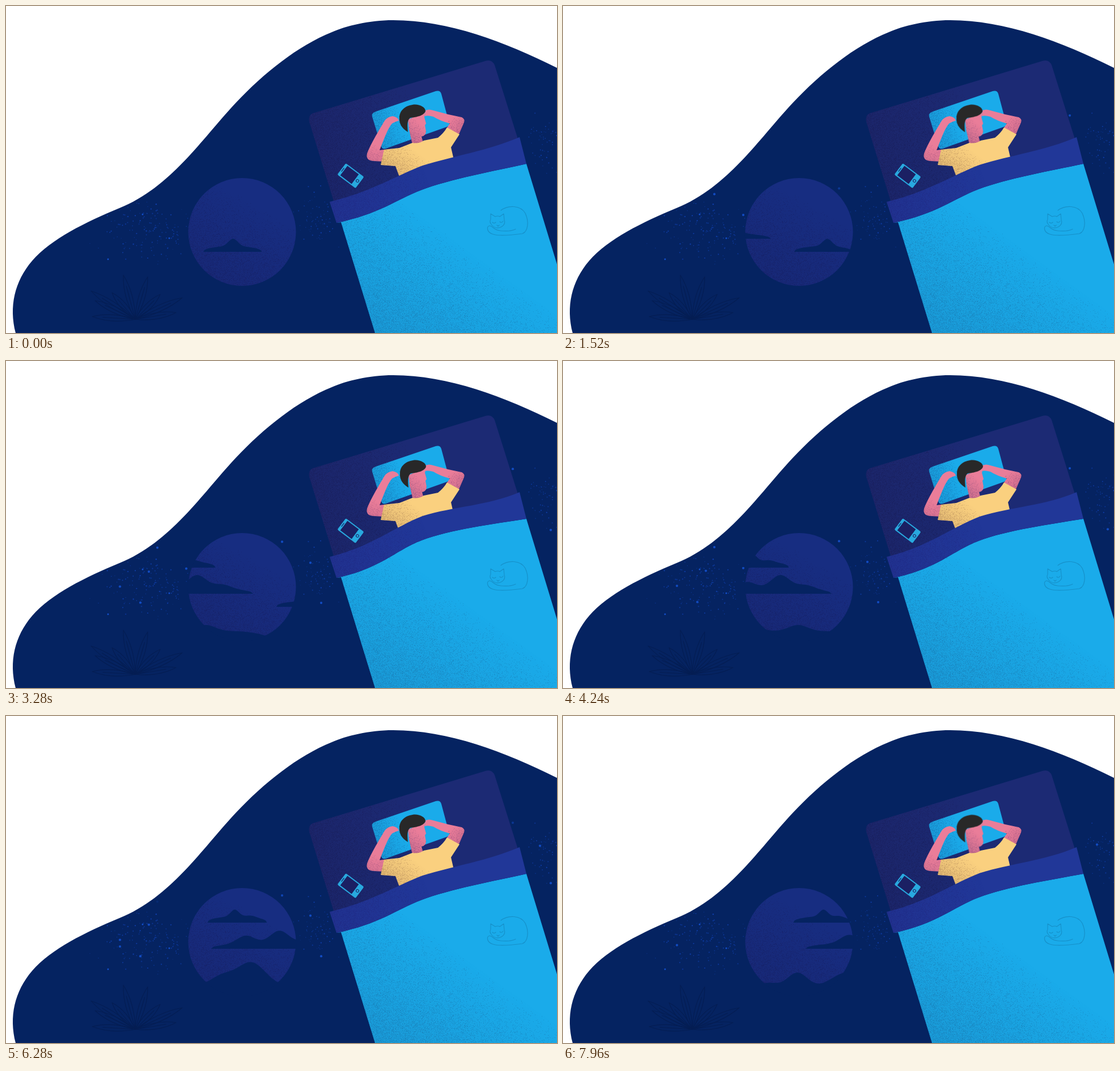
Animation of 972x576 px, one loop 8000 ms. Source, as an HTML page with a canvas:

```html
<!DOCTYPE html>
<html lang="en">
<head>
<meta charset="utf-8">
<title>Asleep under the moon</title>
<style>
html, body { margin: 0; width: 100%; height: 100%; overflow: hidden; background: #fff; }
canvas { display: block; width: 100%; height: 100%; }
</style>
</head>
<body>
<canvas id="stage" width="972" height="576"></canvas>
<script>
const W = 972, H = 576, LOOP = 8000;
const NIGHT = '#052361', SKY_BLUE = '#1aabea', SKIN = '#ea7d99', STAR = '#1450cc';
const stage = document.getElementById('stage').getContext('2d');

let seed = 7;
const random = () => {
  seed = (seed + 0x6D2B79F5) | 0;
  let r = Math.imul(seed ^ seed >>> 15, 1 | seed);
  r = r + Math.imul(r ^ r >>> 7, 61 | r) ^ r;
  return ((r ^ r >>> 14) >>> 0) / 4294967296;
};
const clamp = v => Math.max(0, Math.min(1, v));
const ramp = (t, a, b) => clamp((t - a) / (b - a));
const smooth = v => v * v * (3 - 2 * v);
const bell = (x, center, width) => Math.exp(-(((x - center) / width) ** 2) / 2);
const points = text => text.split(' ').map(p => p.split(',').map(Number));

function layer(draw) {
  const canvas = document.createElement('canvas');
  canvas.width = W;
  canvas.height = H;
  draw(canvas.getContext('2d'));
  return canvas;
}

const toPath = shape => typeof shape === 'string' ? new Path2D(shape) : shape;

function fill(c, shape, color) {
  c.fillStyle = color;
  c.fill(toPath(shape));
}

function stroke(c, shape, color, width) {
  c.strokeStyle = color;
  c.lineWidth = width;
  c.lineCap = c.lineJoin = 'round';
  c.stroke(toPath(shape));
}

function clipped(c, shape, draw) {
  c.save();
  c.clip(toPath(shape));
  draw();
  c.restore();
}

function dot(c, x, y, r) {
  c.beginPath();
  c.arc(x, y, r, 0, 7);
  c.fill();
}

// Soft shade plus fine speckles, both fading out from (x0, y0) to (x1, y1).
function grain(c, rgb, strength, [x, y, w, h], [x0, y0, x1, y1]) {
  const shade = c.createLinearGradient(x0, y0, x1, y1);
  shade.addColorStop(0, `rgba(${rgb},${strength * .5})`);
  shade.addColorStop(1, `rgba(${rgb},0)`);
  c.fillStyle = shade;
  c.fillRect(x, y, w, h);
  const dx = x1 - x0, dy = y1 - y0, len2 = dx * dx + dy * dy;
  c.fillStyle = `rgba(${rgb},${strength * .6})`;
  for (let py = y; py < y + h; py++) {
    for (let px = x; px < x + w; px++) {
      const fade = ((px - x0) * dx + (py - y0) * dy) / len2;
      if (random() > .5 + fade * .5) c.fillRect(px, py, 1, 1);
    }
  }
}

function shaded(c, shape, color, ...shade) {
  fill(c, shape, color);
  clipped(c, shape, () => grain(c, ...shade));
}

// ---- Night backdrop ----
function leaf(x, y) {
  const cx = 228, cy = 552, dx = x - cx, dy = y - cy, n = 11 / Math.hypot(dx, dy);
  const mx = cx + dx * .55, my = cy + dy * .55;
  return `M${cx} ${cy}Q${mx - dy * n} ${my + dx * n} ${x} ${y}Q${mx + dy * n} ${my - dx * n} ${cx} ${cy}` +
    `M${cx} ${cy}L${mx + dx * .2} ${my + dy * .2}`;
}

function speckle(c, cx, cy, sx, sy, count) {
  const spread = () => (random() + random() + random()) / 1.5 - 1;
  for (let i = 0; i < count; i++) {
    c.fillStyle = `rgba(18,70,190,${.35 + random() * .5})`;
    dot(c, cx + spread() * sx, cy + spread() * sy, .5 + random() * .7);
  }
}

const backdrop = layer(c => {
  const hill = 'M17 576C5 530 15 485 46 449C80 410 140 381 200 356C290 320 345 235 405 171' +
    'C455 118 515 70 575 46C600 35 640 25 683 25C780 25 880 63 972 109V576Z';
  fill(c, hill, NIGHT);
  for (const tip of points('150,502 157,519 152,547 187,505 207,474 250,477 272,508 311,514 300,540')) {
    stroke(c, leaf(...tip), '#041d53', 1.1);
  }
  clipped(c, hill, () => {
    speckle(c, 245, 396, 112, 72, 150);
    speckle(c, 553, 375, 62, 70, 75);
    speckle(c, 952, 244, 50, 68, 65);
  });
  c.fillStyle = STAR;
  for (const [x, y] of points('241,367 288,409 180,446')) dot(c, x, y, 1.5);
});

// ---- Stars that fade in one after another, rise a little and fade out ----
const starWaves = [
  { start: 500, spots: points('318,364 267,327 894,188 487,316 237,423 556,423 201,394 961,294 252,367 537,351') },
  { start: 5000, spots: points('942,225 201,402') }
];

function drawStars(t) {
  stage.fillStyle = STAR;
  for (const { start, spots } of starWaves) {
    spots.forEach(([x, y], i) => {
      const age = t - start - i * 220, life = clamp(age / 5800);
      stage.globalAlpha = .9 * smooth(ramp(age, 0, 700)) * smooth(ramp(age, 5800, 4900));
      dot(stage, x, y + 6 * (1 - life) ** 2, 2.1);
    });
  }
  stage.globalAlpha = 1;
}

// ---- Moon and clouds ----
const disc = r => {
  const path = new Path2D();
  path.arc(416.5, 398, r, 0, 7);
  return path;
};
const moonLayer = layer(c =>
  shaded(c, disc(95), '#172d81', '24,28,92', .55, [320, 302, 194, 194], [355, 490, 435, 345]));

// Each bump: position along the cloud, height, width. Bumps creep forward while the cloud drifts.
const clouds = [
  { x: 348, base: 433, width: 103, body: 10, speed: .0393, creep: 4e-5, bumps: [[.51, 13, .08]] },
  { x: 115, base: 410, width: 192, body: 10, speed: .0393, creep: 5e-5,
    bumps: [[0, 15, .08], [.32, 23, .085], [.56, 8, .08]] },
  { x: 165, base: 364, width: 105, body: 11, speed: .0303, creep: 3e-5, bumps: [[.27, 12, .07], [.55, 3, .08]] }
];

function cloudPath({ x, base, width, body, speed, creep, bumps }, t) {
  const path = new Path2D();
  for (let u = 0; u <= 1.001; u += .02) {
    const rise = bumps.reduce((sum, [at, high, wide]) => sum + high * bell(u, at + creep * t, wide), body);
    const taper = Math.max(0, Math.sin(Math.PI * u)) ** .4;
    path.lineTo(x + speed * t + u * width, base - rise * taper);
  }
  return path;
}

// Bank along the moon's lower edge: center, height, width of its swells.
const swells = [[-155, 6, 14], [-104, 24, 17], [-28, 17, 20], [24, 42, 25], [139, 11, 17]];

function bankPath(t) {
  const path = new Path2D(), drift = .065 * t;
  for (let x = 318; x <= 516; x += 2) {
    const u = x - drift;
    const front = 19 * ramp(u, 190, 275) ** 2 + 40 * ramp(u, 272, 290);
    path.lineTo(x, swells.reduce((y, [at, high, wide]) => y - high * bell(u, at, wide), 476 + front));
  }
  path.lineTo(516, 540);
  path.lineTo(318, 540);
  return path;
}

function drawMoon(t) {
  stage.drawImage(moonLayer, 0, 0);
  clipped(stage, disc(96), () => {
    for (const cloud of clouds) fill(stage, cloudPath(cloud, t), NIGHT);
    fill(stage, bankPath(t), NIGHT);
  });
}

// ---- Bed ----
const bedLayer = layer(c => {
  shaded(c, 'M541 189L845 97Q857 93 862 104L908 250L580 350L535 204Q533 192 541 189Z', '#1c2a74',
    '25,24,78', .5, [530, 90, 380, 260], [540, 280, 735, 220]);
  shaded(c, 'M652 186L758 150Q766 148 768 155L783 211L670 251Q664 253 662 247L646 195Q644 189 652 186Z', SKY_BLUE,
    '20,80,140', .45, [640, 145, 145, 110], [645, 225, 703, 205]);

  c.save();
  c.translate(608, 299);
  c.rotate(.645);
  c.fillStyle = '#28a9df';
  c.beginPath();
  c.roundRect(-20, -12.5, 40, 25, 2);
  c.fill();
  c.fillStyle = c.strokeStyle = '#1b2063';
  c.fillRect(-15, -10.5, 25, 21);
  c.fillRect(-18, -4, 1.2, 8);
  c.beginPath();
  c.arc(15, 0, 2.4, 0, 7);
  c.stroke();
  c.restore();
});

// ---- Sleeper ----
const armsLayer = layer(c => {
  shaded(c, 'M693 202Q692 196 682 194Q673 195 668 202C656 222 642 246 637 260Q634 272 648 273L666 274' +
    'L668 253L659 254C666 237 673 216 681 207Q688 203 693 202Z', SKIN,
    '120,60,110', .35, [634, 192, 60, 84], [645, 278, 655, 245]);
  shaded(c, 'M740 184Q746 181 754 184Q778 191 804 196Q810 199 808 205L798 228L776 217L783 207' +
    'Q765 202 754 195Q744 192 739 194Z', SKIN,
    '120,60,110', .45, [738, 180, 72, 48], [805, 222, 785, 196]);
});

const headLayer = layer(c => {
  shaded(c, 'M709 200L740 187L738 196L741 207L739 210L741 221Q740 229 733 230L736 241L717 244L711 218Z', SKIN,
    '105,60,110', .45, [706, 185, 38, 60], [711, 234, 733, 208]);
  fill(c, 'M709 222C698 216 693 206 694 197C694 184 704 176 717 174C728 172 740 178 740 185' +
    'C738 193 724 196 713 197C707 202 708 211 709 222Z', '#282828');
});

const shirtLayer = layer(c =>
  shaded(c, 'M667 253L694 250L717 241Q728 243 737 237L762 232Q772 224 778 214L800 226L785 249L791 275L696 306L687 282L661 280Z',
    '#fad07f', '140,100,70', .48, [660, 210, 142, 98], [675, 305, 717, 250]));

const foldGrain = layer(c => grain(c, '32,32,115', .4, [568, 225, 352, 160], [575, 370, 745, 305]));
const coverGrain = layer(c => grain(c, '24,84,135', .42, [583, 270, 389, 306], [630, 600, 775, 400]));

// 0 = breathed out, 1 = breathed in.
function breath(t) {
  t %= 5800;
  return smooth(ramp(t, 950, 3250)) - smooth(ramp(t, 3950, 5300));
}

function drawBlanket(lift) {
  const y = (rest, share = 1) => rest - lift * 8 * share;
  const hem = `C660 366 688 ${y(341)} 733 ${y(324)}C783 ${y(305)} 860 ${y(291, .5)} 918 278`;
  const hemBack = `C860 ${y(291, .5)} 783 ${y(305)} 733 ${y(324)}C688 ${y(341)} 660 366 583 382`;
  const cover = new Path2D(`M583 382${hem}L972 455V576H651L591 381Z`);
  const fold = new Path2D(
    `M571 345C640 329 690 ${y(298)} 735 ${y(281)}C790 ${y(264)} 850 255 906 231L918 278${hemBack}Z`);
  fill(stage, cover, SKY_BLUE);
  clipped(stage, cover, () => stage.drawImage(coverGrain, 0, 0));
  fill(stage, fold, '#213798');
  clipped(stage, fold, () => stage.drawImage(foldGrain, 0, 0));
}

function drawCat() {
  const line = '#1690c9';
  stroke(stage, 'M873 360C886 350 908 351 916 365C923 380 921 397 911 401C896 403 870 406 859 402' +
    'C848 399 847 388 853 387C860 388 860 395 873 396C883 397 893 396 899 393', line, 1.2);
  stroke(stage, 'M857 386Q852 380 855 376L855 366L863 371Q868 369 871 371L878 366L879 377Q882 384 874 389Q864 394 857 386Z' +
    'M858 381Q861 384 864 381M871 380Q874 383 877 379M866 386L868 388L870 386', line, 1.1);
}

function frame(now) {
  const t = now % LOOP, lift = breath(t);
  stage.clearRect(0, 0, W, H);
  stage.drawImage(backdrop, 0, 0);
  drawStars(t);
  drawMoon(t);
  stage.drawImage(bedLayer, 0, 0);
  stage.drawImage(armsLayer, 0, 0);
  stage.drawImage(headLayer, lift, lift);
  stage.drawImage(shirtLayer, 0, 0);
  drawBlanket(lift);
  drawCat();
  requestAnimationFrame(frame);
}
frame(0);
</script>
</body>
</html>
```
